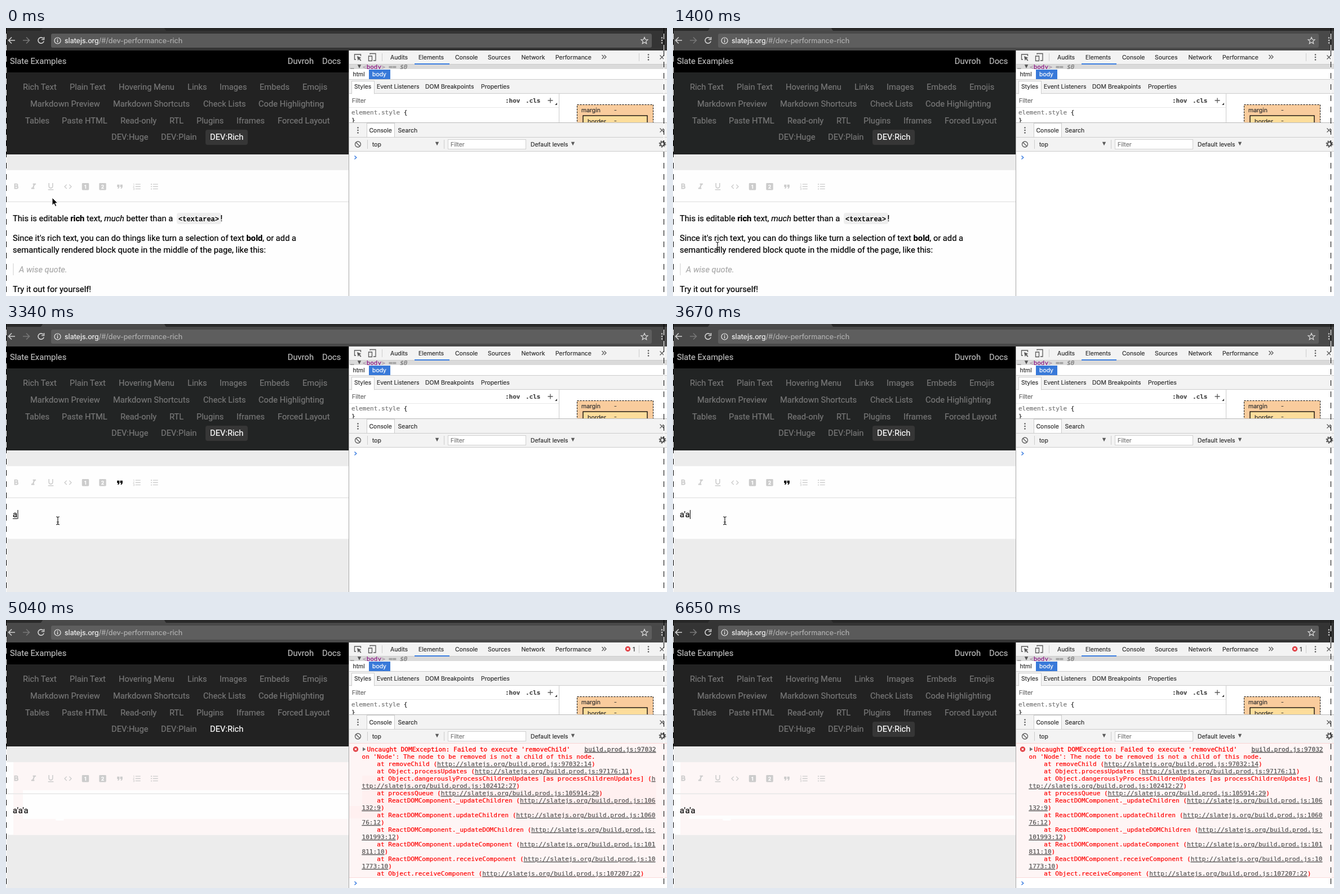
Recreate the animation shown at these times as an HTML page. Size 1173x477 px, loop 6750 ms.

```html
<!DOCTYPE html>
<html lang="en">
<head>
<meta charset="utf-8">
<title>Rich text editor</title>
<style>
html, body { margin: 0; width: 100%; height: 100%; overflow: hidden; background: #fff; }
svg { display: block; width: 100%; height: 100%; color: #000; }
/* A hairline stroke gives the slightly heavier look of smoothed screen type. */
text, tspan { white-space: pre; fill: currentColor; stroke: currentColor; stroke-width: .2; }
.page { font: 14.7px Roboto, sans-serif; }
.ui { font: 10.45px Inter, sans-serif; color: #303030; }
.url { font: 12.5px Inter, sans-serif; color: #f2f2f2; }
.mono { font: 11px "DejaVu Sans Mono", monospace; }
.log { font: 11.1px "DejaVu Sans Mono", monospace; color: #f00; stroke-width: .3; }
.code { font: bold 12px "Liberation Mono", monospace; stroke-width: 0; }
.badge { font: bold 14px Roboto, sans-serif; color: #fff; }
.b { font-weight: 700; }
.i { font-style: italic; }
.link { color: #545454; text-decoration: underline; }
.line { fill: none; stroke: #5a5a5a; stroke-width: 1.3; }
</style>
</head>
<body>
<svg id="stage" viewBox="0 0 1173 477" preserveAspectRatio="none"></svg>
<script>
const LOOP = 6750;
const stage = document.getElementById('stage');

const esc = s => s.replace(/&/g, '&amp;').replace(/</g, '&lt;');
const rect = (x, y, w, h, fill, extra = '') =>
  `<rect x="${x}" y="${y}" width="${w}" height="${h}" fill="${fill}" ${extra}/>`;
const text = (x, y, s, cls, color = '', extra = '') =>
  `<text x="${x}" y="${y}" class="${cls}" ${color && `style="color:${color}"`} ${extra}>${esc(s)}</text>`;
const path = (d, extra = 'class="line"') => `<path d="${d}" ${extra}/>`;
const hline = (x, y, w, fill = '#ccc') => rect(x, y, w, 1, fill);
const vline = (x, y, h, fill = '#ccc') => rect(x, y, 1, h, fill);
const dots = (x, y, fill) => [-4.5, 0, 4.5].map(d => `<circle cx="${x}" cy="${y + d}" r="1.3" fill="${fill}"/>`).join('');
const cross = (x, y, r, extra) => path(`M${x - r} ${y - r}l${2 * r} ${2 * r}m0 ${-2 * r}l${-2 * r} ${2 * r}`, extra);
const triangle = (x, y, r, fill = '#5a5a5a') => path(`M${x - r} ${y - r}h${2 * r}l${-r} ${2 * r}z`, `fill="${fill}"`);
const errorBadge = (x, y) => `<circle cx="${x}" cy="${y}" r="4.7" fill="#e0393e"/>` +
  cross(x, y, 1.8, 'stroke="#fff" stroke-width="1.3"');
// Shown only inside the given "from-to" time spans, in ms.
const during = (spans, body) => `<g data-on="${spans}">${body}</g>`;

function browserBar() {
  const bar = (strip, fill, field) => rect(0, 0, 1173, 6, strip) + rect(0, 5, 1173, 35, fill) +
    path('M60 6Q63 5 65 0H281Q283 5 286 6z', `fill="${fill}"`) + rect(80, 10, 1066, 25, field, 'rx="3"');
  const icon = 'fill="none" stroke="#d0d0d0" stroke-width="1.6"';
  return during('0-150,6650-6750', bar('#272727', '#343434', '#5a5a5a')) +
    during('150-6650', bar('#292929', '#494949', '#5e5e5e')) +
    path('M16 22H5m5-5.5l-5.5 5.5 5.5 5.5', icon) +
    path('M30 22h11m-5-5.5l5.5 5.5-5.5 5.5', 'fill="none" stroke="#777" stroke-width="1.6"') +
    path('M66 18.5a5.2 5.2 0 1 0 1.2 5M67.5 16v4.5H63', icon) +
    '<circle cx="91.5" cy="22.5" r="5.5" fill="none" stroke="#eee" stroke-width="1.2"/>' +
    path('M91.5 21.5v4m0-6.5v1.5', 'stroke="#eee" stroke-width="1.4"') +
    path('M1133 16.5l1.7 4 4.3.3-3.3 2.8 1 4.2-3.7-2.3-3.7 2.3 1-4.2-3.3-2.8 4.3-.3z',
      'fill="none" stroke="#ddd" stroke-width="1.2"') +
    dots(1164, 22, '#ccc') +
    '<text x="104" y="27" class="url">slatejs.org<tspan style="color:#b0b0b0">/#/dev-performance-rich</tspan></text>';
}

function siteHeader() {
  const rows = [
    [110, [30, 'Rich Text'], [113, 'Plain Text'], [200, 'Hovering Menu'], [322, 'Links'], [379, 'Images'], [450, 'Embeds'], [526, 'Emojis']],
    [140, [43, 'Markdown Preview'], [190, 'Markdown Shortcuts'], [350, 'Check Lists'], [448, 'Code Highlighting']],
    [169.5, [34, 'Tables'], [99, 'Paste HTML'], [203, 'Read-only'], [290, 'RTL'], [338, 'Plugins'], [409, 'Iframes'], [482, 'Forced Layout']],
    [199, [187, 'DEV:Huge'], [275, 'DEV:Plain']]
  ];
  return rect(0, 40, 608, 39, '#000') + rect(0, 79, 608, 146, '#222') +
    during('150-4000', rect(0, 79, 608, 146, '#222424')) +
    text(7, 64, 'Slate Examples', 'page', '#b8b8b8') +
    text(546, 64, 'Duvroh', 'page', '#b8b8b8', 'text-anchor="end"') +
    text(561, 64, 'Docs', 'page', '#b8b8b8') +
    rows.map(([y, ...items]) => items.map(([x, s]) => text(x, y, s, 'page', '#777')).join('')).join('') +
    during('0-4000,6650-6750', rect(354, 181, 75, 27, '#363636', 'rx="4"')) +
    text(362, 199, 'DEV:Rich', 'page', '#fff');
}

function formatIcons() {
  const stroke = w => `fill="none" stroke="#ccc" stroke-width="${w}"`;
  const at = (x, body) => `<g transform="translate(${x - 8.28} 274) scale(.69)">${body}</g>`;
  const digit = n => rect(3, 3, 18, 18, '#ccc', 'rx="2"') + text(12, 17, n, 'badge', '', 'text-anchor="middle"');
  const bars = path('M8 6h13M8 12h13M8 18h13', stroke(2));
  const quote = fill => at(202, path('M6 17h3l2-4V7H5v6h3zm8 0h3l2-4V7h-6v6h3z', `fill="${fill}"`));
  return at(18, path('M8.5 5.2h4.3a2.8 2.8 0 0 1 0 5.6H8.5zm0 5.6h5a2.9 2.9 0 0 1 0 5.8h-5z', stroke(2.7))) +
    at(49, path('M10 5.5h8M6 16.5h8M14.2 5.5l-4.4 11', stroke(3))) +
    at(79.5, path('M7.2 3v8a4.8 4.8 0 0 0 9.6 0V3M5 20h14', stroke(2.3))) +
    at(110, path('M8.7 6.7L3.4 12l5.3 5.3m6.6-10.6L20.6 12l-5.3 5.3', stroke(2))) +
    at(141, digit('1')) + at(171.5, digit('2')) +
    during('0-2350,4000-6750', quote('#ccc')) + during('2350-4000', quote('#000')) +
    at(232.5, bars + path('M2.5 4.5h1.5v4M2 10.5h3l-3 3.5h3M2 16h3v4H2m1-2h2', stroke(1))) +
    at(263.5, bars + [6, 12, 18].map(y => `<circle cx="4" cy="${y}" r="1.5" fill="#ccc"/>`).join(''));
}

function editor() {
  const selection = [[12, 330, 290], [305, 330, 74], [380, 330, 7], [12, 365, 515], [12, 385, 457], [23, 420, 91], [12, 455.5, 140]]
    .map(([x, y, w]) => rect(x, y, w, 18, '#b1d4fd')).join('');
  const article = rect(303, 329, 79, 20, '#eee', 'rx="4"') + during('2060-3340', selection) +
    '<text x="12" y="344" class="page">This is editable <tspan class="b">rich</tspan> text, <tspan class="i">much</tspan> better than a</text>' +
    text(306, 344, '<textarea>', 'code') + text(380.5, 344, '!', 'page') +
    during('2060-3340', path('M313 345.5h58', 'stroke="#f03a3a" stroke-width="1.5" stroke-dasharray="2 1.5"')) +
    `<text x="12" y="379" class="page">Since it's rich text, you can do things like turn a selection of text <tspan class="b">bold</tspan>, or add a</text>` +
    text(12, 399.5, 'semantically rendered block quote in the middle of the page, like this:', 'page') +
    rect(12, 419, 2, 21, '#e6e6e6') + text(23, 434.5, 'A wise quote.', 'page i', '#aaa') +
    text(12, 469.5, 'Try it out for yourself!', 'page');
  const caret = x => rect(x, 331, 1, 16, '#000');
  const typed = (spans, s) => during(spans, text(12, 344, s, 'page'));
  const white = '#fefefe';
  return rect(0, 225, 608, 252, '#ececec') + rect(0, 253, 608, 129.5, white) +
    during('0-3340', rect(0, 382, 608, 95, white)) +
    during('4000-6750', rect(13, 253, 595, 129.5, '#fdf6f6')) +
    during('4510-6650', rect(30, 303, 578, 51, white)) +
    during('6650-6750', rect(28, 348, 580, 6, white)) +
    during('4510-6750', rect(88, 353, 15, 4, white, 'rx="2"')) +
    rect(0, 308.5, 608, 1.6, '#e8e8e8') + formatIcons() + during('0-3340', article) +
    typed('3340-3490', 'a') + typed('3490-3670', "a'") + typed('3670-4000', "a'a") + typed('4000-6750', "a'a'a") +
    during('3340-3490', rect(12, 346, 8, 1, '#000') + caret(20.5)) +
    during('3490-3670', caret(23)) +
    during('3670-4690,5190-5640,6080-6650', caret(30));
}

function inspector() {
  const grey = '#f3f3f3';
  const labels = (y, ...items) => items.map(([x, s]) => text(x, y, s, 'ui')).join('');
  return rect(608, 40, 565, 437, '#fff') + rect(609, 40, 564, 25, grey) + hline(609, 64, 564) +
    path('M621 56h-2.5V47h11v3') + path('M623 50l7.5 3-3 1.3 3 3.2-1.3 1.2-3-3.2-1.5 2.8z', 'fill="#5a5a5a"') +
    path('M646 47v-1.5h10v12.5h-4M643.5 50h6v8.5h-6z') + vline(667, 45, 14) +
    labels(55.5, [682, 'Audits'], [732, 'Elements'], [797, 'Console'], [855, 'Sources'], [914.5, 'Network'], [975, 'Performance']) +
    rect(725, 63, 62, 2, '#3b7de0') + path('M1057.5 48l3.5 3.5-3.5 3.5m4-7l3.5 3.5-3.5 3.5') +
    vline(1123, 45, 14) + dots(1140, 52, '#5a5a5a') + cross(1164, 52, 3.5) +
    during('4000-6750', errorBadge(1103.5, 51.5) + text(1112, 55.5, '1', 'ui')) +
    '<g clip-path="url(#node)">' + rect(609, 65, 564, 8, '#dadada') +
    text(611, 72.5, '…', 'mono', '#888') + triangle(627, 68.5, 3.2, '#555') +
    '<text x="633" y="72.5" class="mono" style="color:#a894a6">&lt;<tspan style="color:#881280">body</tspan>&gt;' +
    '<tspan class="i" style="color:#777"> == $0</tspan></text></g>' +
    text(615.5, 86, 'html', 'ui') + rect(644, 74, 38, 17, '#3879d9') + text(650, 86, 'body', 'ui', '#fff') +
    rect(609, 91, 564, 26, grey) + hline(609, 91, 564) + hline(609, 116, 564) +
    rect(613.5, 94.5, 40, 22.5, '#fff', 'stroke="#ccc"') + rect(614, 116, 39, 2, '#fff') +
    labels(108, [618, 'Styles'], [658, 'Event Listeners'], [744, 'DOM Breakpoints'], [843, 'Properties']) +
    text(614, 132.5, 'Filter', 'ui', '#666') + text(886, 132.5, ':hov', 'mono b', '#444') + text(922, 132.5, '.cls', 'mono b', '#444') +
    path('M961.5 129h9m-4.5-4.5v9') + path('M978 133v4h-4z', 'fill="#444"') +
    hline(609, 141, 372, '#e8e8e8') + vline(981, 117, 51) +
    '<g clip-path="url(#styles)"><text x="613" y="153.5" class="mono" style="color:#777">element.style <tspan style="color:#222">{</tspan></text>' +
    text(613, 167.5, '}', 'mono', '#222') +
    rect(1013.5, 136.5, 135, 50, '#f9cc9d', 'stroke="#000" stroke-dasharray="3 2"') + text(1021, 150, 'margin', 'ui') + text(1079, 150, '-', 'ui') +
    rect(1024, 156, 114, 40, '#fddd9b', 'stroke="#000" stroke-width="1.3"') + text(1032, 169.5, 'border', 'ui') + text(1079, 169, '-', 'ui') + '</g>' +
    rect(609, 168, 564, 51, grey) + hline(609, 168, 564, '#bbb') + hline(609, 194, 564) + hline(609, 219, 564) +
    dots(624.5, 182, '#5a5a5a') + rect(640.5, 169.5, 49, 25, '#fff', 'stroke="#ccc"') +
    labels(186, [644.5, 'Console'], [695.5, 'Search']) + cross(1164, 182, 3.5) +
    '<circle cx="624.5" cy="207" r="5" class="line"/>' + path('M621 203.5l7 7') + vline(641, 199, 16) + vline(777, 199, 16) +
    text(650, 210.5, 'top', 'ui') + triangle(765, 206, 3.2) +
    rect(784.5, 198.5, 138, 17, '#fff', 'stroke="#d0d0d0"') + text(789, 210.5, 'Filter', 'ui', '#777') +
    text(931, 210.5, 'Default levels', 'ui') + triangle(1006, 206, 3.2) +
    '<circle cx="1165" cy="206.5" r="3.6" class="line" style="stroke-width:2.2"/>' +
    '<circle cx="1165" cy="206.5" r="5.4" class="line" style="stroke-width:2;stroke-dasharray:2.12"/>' +
    vline(608, 40, 437, '#a8a8a8');
}

// Text between tildes is a link.
const trace = `on 'Node': The node to be removed is not a child of this node.
    at removeChild (~http://slatejs.org/build.prod.js:97032:14~)
    at Object.processUpdates (~http://slatejs.org/build.prod.js:97176:11~)
    at Object.dangerouslyProcessChildrenUpdates [as processChildrenUpdates] (~h
~ttp://slatejs.org/build.prod.js:102412:27~)
    at processQueue (~http://slatejs.org/build.prod.js:105914:29~)
    at ReactDOMComponent._updateChildren (~http://slatejs.org/build.prod.js:106
~132:9~)
    at ReactDOMComponent.updateChildren (~http://slatejs.org/build.prod.js:1060
~76:12~)
    at ReactDOMComponent._updateDOMChildren (~http://slatejs.org/build.prod.js:
~101993:12~)
    at ReactDOMComponent.updateComponent (~http://slatejs.org/build.prod.js:101
~811:10~)
    at ReactDOMComponent.receiveComponent (~http://slatejs.org/build.prod.js:10
~1773:10~)
    at Object.receiveComponent (~http://slatejs.org/build.prod.js:107207:22~)`;

function consoleLog() {
  const prompt = y => path(`M618.5 ${y - 3}l3.3 3-3.3 3`, 'fill="none" stroke="#3b7de0" stroke-width="1.5"');
  const lines = trace.split('\n').map((line, n) => {
    const parts = line.split('~').map((s, k) => `<tspan ${k % 2 ? 'class="link"' : ''}>${esc(s)}</tspan>`);
    return `<text x="631.5" y="${247 + 13 * n}" class="log">${parts.join('')}</text>`;
  });
  return during('0-4000', prompt(230.5)) +
    during('4000-6750', rect(609, 220, 564, 238, '#fef5f5') + hline(609, 219, 564, '#f8d4d4') + hline(609, 458, 564, '#fbd9d9') +
      during('4510-6650', rect(632, 277, 522, 54, '#fff0f0') + rect(609, 331, 445, 22, '#fff0f0')) +
      errorBadge(620.5, 230) + path('M633 226.5v7l5.5-3.5z', 'fill="#727272"') +
      text(640.5, 234, "Uncaught DOMException: Failed to execute 'removeChild'", 'log') +
      text(1153.5, 234, 'build.prod.js:97032', 'log link', '', 'text-anchor="end"') +
      lines.join('') + prompt(468.5));
}

const edge = x => path(`M${x} 0V477`, 'stroke="#000"') +
  path(`M${x} 10V477`, 'stroke="#fff" stroke-dasharray="10"');

const arrow = path('M0 0v13.5l3.2-2.9 2.2 5 2.3-1-2.2-4.9h4.3z', 'fill="#000" stroke="#fff"');
const beam = path('M-3-7Q0-7 0-5Q0-7 3-7M0-5V5M-3 7Q0 7 0 5Q0 7 3 7M-2 2.5H2', 'fill="none" stroke="#222" stroke-width="1.2"');

stage.innerHTML = `<defs><clipPath id="node">${rect(609, 65, 564, 8, '#000')}</clipPath>
  <clipPath id="styles">${rect(609, 117, 564, 51, '#000')}</clipPath></defs>` +
  browserBar() + siteHeader() + editor() + inspector() + consoleLog() + edge(0.5) + edge(1167.5) +
  `<g id="pointer">${during('0-150', arrow)}${during('150-4510', beam)}</g>`;

const pointer = document.getElementById('pointer');
const timed = [...stage.querySelectorAll('[data-on]')].map(node => ({
  node, spans: node.dataset.on.split(',').map(s => s.split('-').map(Number))
}));
// Time, x, y: the pointer jumps from place to place.
const moves = [[0, 82, 302], [150, 80, 332], [300, 76, 372], [460, 73, 412], [620, 72, 442], [780, 73, 456],
  [940, 75, 440], [1100, 77, 418], [1250, 79, 400], [1400, 79, 388], [1640, 72, 372], [1850, 64, 356], [2060, 61, 350], [2350, 92, 350]];

function render(now) {
  const t = now % LOOP;
  for (const { node, spans } of timed)
    node.style.display = spans.some(([from, to]) => t >= from && t < to) ? '' : 'none';
  const [, x, y] = moves.findLast(([from]) => t >= from);
  pointer.setAttribute('transform', `translate(${x} ${y})`);
}

let start;
function tick(now) {
  start ??= now;
  render(now - start);
  requestAnimationFrame(tick);
}
render(0);
requestAnimationFrame(tick);
</script>
</body>
</html>
```
